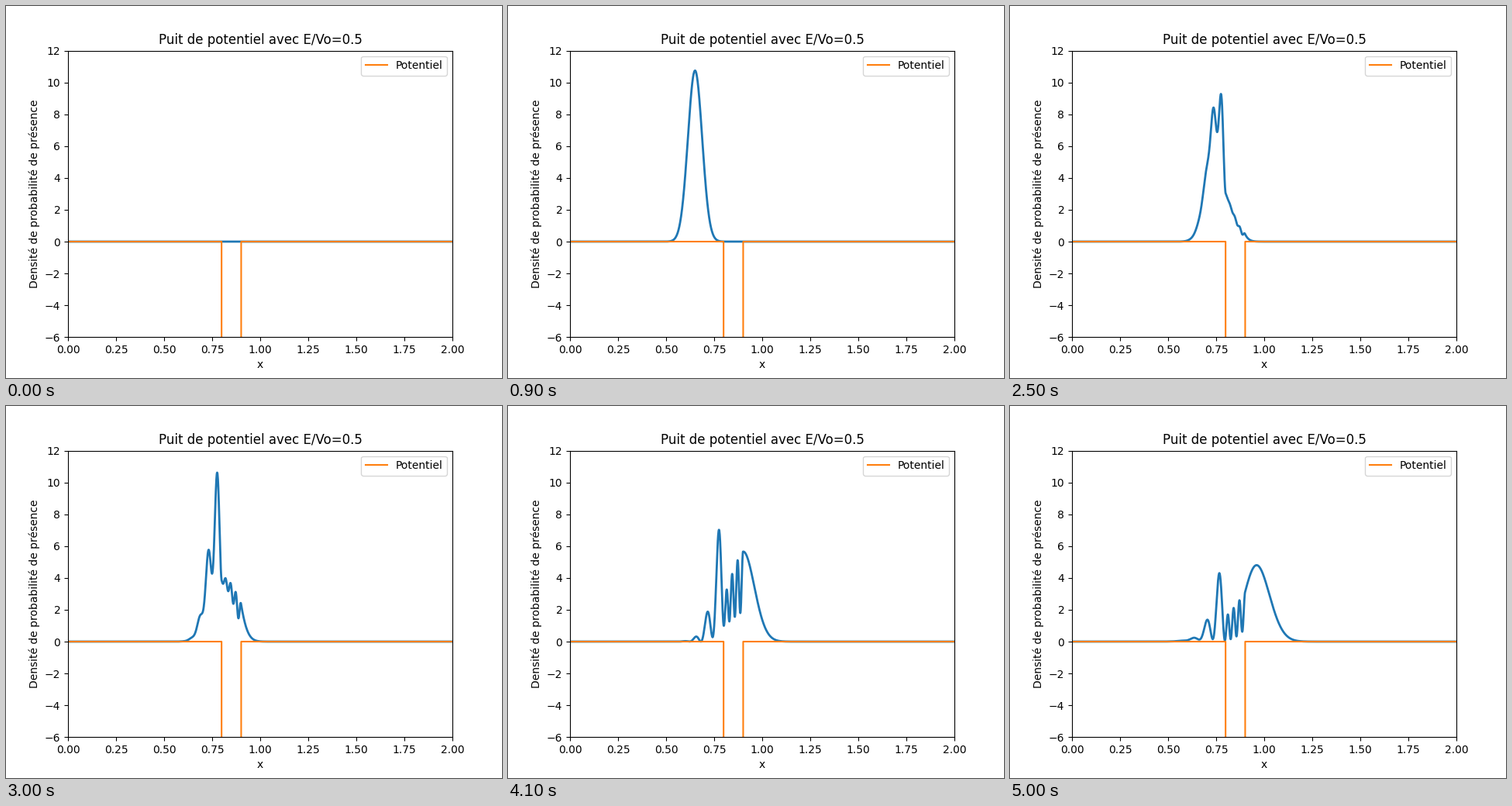
A matplotlib script that plays this animation: 640x480 px, repeating every 5.1 s.

```python
import math

import numpy as np
import matplotlib.pyplot as plt
from matplotlib.animation import FuncAnimation

# Space and time grid
DX, DT = 0.001, 1e-7
NX = 2000
FRAMES = 51
PAIRS_PER_FRAME = 500
S = DT / DX**2

# Wave packet and well
CENTER, SIGMA = 0.6, 0.05
V0, RATIO = -4000, 0.5
K = math.sqrt(2 * abs(RATIO * V0))

x = np.linspace(0, (NX - 1) * DX, NX)
well = np.zeros(NX)
well[(x >= 0.8) & (x <= 0.9)] = V0


def densities():
    """Leapfrog the Schrodinger equation and keep one density per frame."""
    amp = 1 / math.sqrt(SIGMA * math.sqrt(math.pi))
    psi = amp * np.exp(1j * K * x - (x - CENTER) ** 2 / (2 * SIGMA**2))
    re, im = psi.real.copy(), psi.imag.copy()
    diag = 2 * (S + well[1:-1] * DT)

    def push(f):
        return S * (f[2:] + f[:-2]) - diag * f[1:-1]

    out = np.zeros((FRAMES, NX))  # the first frame stays empty
    for frame in range(1, FRAMES):
        old = im[1:-1].copy()
        im[1:-1] += push(re)
        out[frame, 1:-1] = re[1:-1] ** 2 + im[1:-1] * old
        re[1:-1] -= push(im)
        for _ in range(PAIRS_PER_FRAME - 1):
            im[1:-1] += push(re)
            re[1:-1] -= push(im)
    return out


density = densities()

fig, ax = plt.subplots(figsize=(6.4, 4.8), dpi=100)
curve, = ax.plot(x, density[0], lw=2)
ax.plot(x, well, label="Potentiel")
ax.set(xlim=(0, 2), ylim=(-6, 12), xlabel="x",
       ylabel="Densité de probabilité de présence",
       title=f"Puit de potentiel avec E/Vo={RATIO}")
ax.legend(loc="upper right")


def init():
    curve.set_ydata(density[0])
    return curve,


def update(frame):
    curve.set_ydata(density[frame])
    return curve,


anim = FuncAnimation(fig, update, frames=FRAMES, init_func=init,
                     interval=100, repeat=True, blit=False)
plt.show()
```
